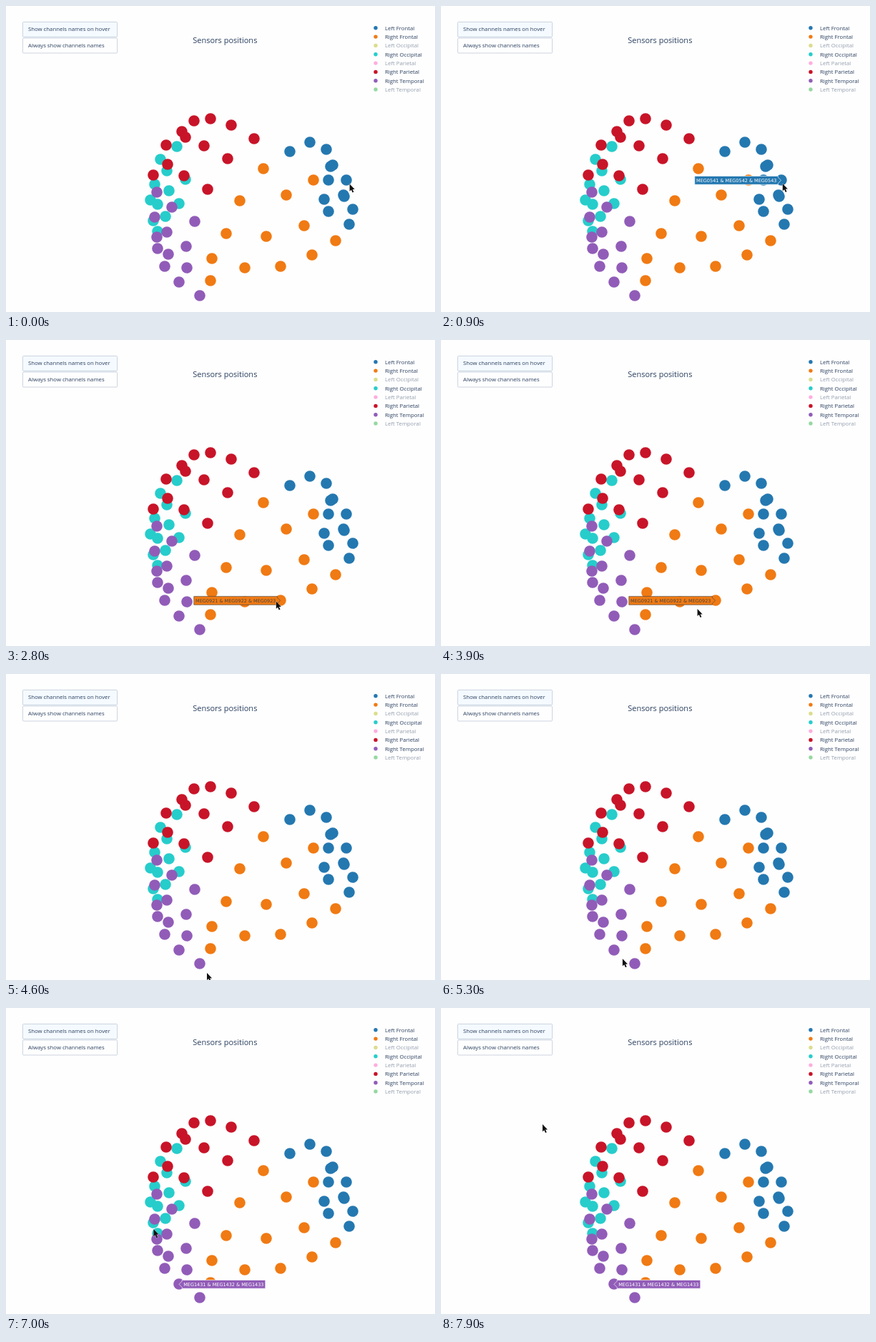
An HTML page for the animation above (8 s loop, 600 px wide and 429 px high).

```html
<!DOCTYPE html>
<html lang="en">
<head>
<meta charset="utf-8">
<title>Sensors positions</title>
<style>
  html, body { margin: 0; width: 100%; height: 100%; overflow: hidden; background: #fefefe; }
  svg { display: block; width: 100vw; height: 100vh; }
  text { font-family: "Open Sans", "Noto Sans", sans-serif; font-size: 7.78px; fill: #2a3f5f; }
  .title { font-size: 11px; text-anchor: middle; }
  .tip text { font-family: "DejaVu Sans", sans-serif; font-size: 6.5px; }
</style>
</head>
<body>
<svg id="stage" viewBox="0 0 600 429"></svg>
<script>
const LOOP = 8000, STEP = 100;
const stage = document.getElementById('stage');

function add(parent, tag, attrs, text) {
  const node = document.createElementNS('http://www.w3.org/2000/svg', tag);
  for (const key in attrs) node.setAttribute(key, attrs[key]);
  if (text) node.textContent = text;
  parent.appendChild(node);
  return node;
}

const groups = [
  { name: 'Left Frontal', color: '#2478b0',
    dots: '397,204 425,191 448,201 457,223 454,225 451,244 476,244 445,271 472,265 473,267 451,288 485,285 480,306' },
  { name: 'Right Frontal', color: '#f07a13',
    dots: '360,228 430,244 392,265 327,273 308,319 364,323 417,308 461,329 428,349 384,365 334,367 288,354 286,385' },
  { name: 'Left Occipital', color: '#bcbd22' },
  { name: 'Right Occipital', color: '#26cdcb',
    dots: '239,197 216,215 225,231 208,250 251,243 228,259 202,272 212,278 242,277 223,295 206,301 212,316' },
  { name: 'Left Parietal', color: '#ff5fc0' },
  { name: 'Right Parietal', color: '#c81428',
    dots: '263,161 286,158 315,167 246,176 251,184 347,186 224,195 277,196 310,214 226,222 206,237 249,238 282,257' },
  { name: 'Right Temporal', color: '#915cb8',
    dots: '211,261 232,282 208,296 264,302 225,317 211,324 212,340 252,337 227,348 222,365 253,367 242,387 271,406' },
  { name: 'Left Temporal', color: '#2fb344' }
];

function button(y, label, fill) {
  add(stage, 'rect', { x: 23.4, y, width: 132.2, height: 21, rx: 1.3, fill, stroke: '#bec8d9', 'stroke-width': 0.8 });
  add(stage, 'text', { x: 31, y: y + 12.6 }, label);
}

button(22.4, 'Show channels names on hover', '#f4faff');
button(45, 'Always show channels names', '#fefefe');
add(stage, 'text', { class: 'title', x: 306.3, y: 52 }, 'Sensors positions');

groups.forEach(({ name, color, dots }, i) => {
  const y = 30.8 + i * 12.32;
  const row = add(stage, 'g', { opacity: dots ? 1 : 0.5 });
  add(row, 'circle', { cx: 517, cy: y, r: 2.7, fill: color });
  add(row, 'text', { x: 530, y: y + 2.8 }, name);
  for (const dot of dots ? dots.split(' ') : []) {
    const [cx, cy] = dot.split(',');
    add(stage, 'circle', { cx, cy, r: 7.8, fill: color });
  }
});

// side is -1 when the label lies left of its point, 1 when right
function tooltip(x, y, side, first, fill, ink, from, to) {
  const label = [0, 1, 2].map(n => 'MEG' + String(first + n).padStart(4, '0')).join(' & ');
  const node = add(stage, 'g', { class: 'tip', transform: `translate(${x} ${y})` });
  add(node, 'path', {
    d: `M0 0L${4.2 * side} -4.2V-5.9h${116.6 * side}v11.8H${4.2 * side}V4.2Z`,
    fill, stroke: ink, 'stroke-width': 0.65
  });
  add(node, 'text', { x: 6.2 * side, y: 2.4, fill: ink, style: `fill:${ink}`, 'text-anchor': side < 0 ? 'end' : 'start' }, label);
  return { node, from, to };
}

const tips = [
  tooltip(475.6, 244.4, -1, 541, '#2478b0', '#fff', 100, 2500),
  tooltip(383.6, 365.3, -1, 921, '#f07a13', '#444', 2500, 4300),
  tooltip(242, 387.3, 1, 1431, '#915cb8', '#fff', 5600, LOOP)
];

const cursor = add(stage, 'path', {
  d: 'M0 0V10.2L2.3 8.2L4 12.1L5.8 11.3L4.1 7.5H7.1Z',
  fill: '#111', stroke: '#fff', 'stroke-width': 0.6, 'paint-order': 'stroke'
});

// time, x, y of the pointer tip
const path = [
  [0, 480.6, 249.5], [300, 477.8, 249], [1000, 477.8, 249], [1600, 520, 325], [1900, 520, 325],
  [2700, 377.8, 366.5], [3700, 377.8, 366.5], [4400, 281, 419], [4800, 281, 419],
  [5600, 241.4, 390], [6600, 241.4, 390], [7600, 142, 163], [LOOP, 142, 163]
];

function pointer(t) {
  const i = path.findIndex(p => p[0] > t);
  const [t0, x0, y0] = path[i - 1], [t1, x1, y1] = path[i];
  const u = (t - t0) / (t1 - t0), k = u * u * (3 - 2 * u);
  return [x0 + (x1 - x0) * k, y0 + (y1 - y0) * k];
}

function render(now) {
  const t = Math.floor((now % LOOP) / STEP) * STEP;
  for (const { node, from, to } of tips) {
    node.setAttribute('visibility', t >= from && t < to ? 'visible' : 'hidden');
  }
  cursor.setAttribute('transform', `translate(${pointer(t)})`);
}

const start = performance.now();
function tick() {
  render(performance.now() - start);
  requestAnimationFrame(tick);
}
tick();
</script>
</body>
</html>
```
